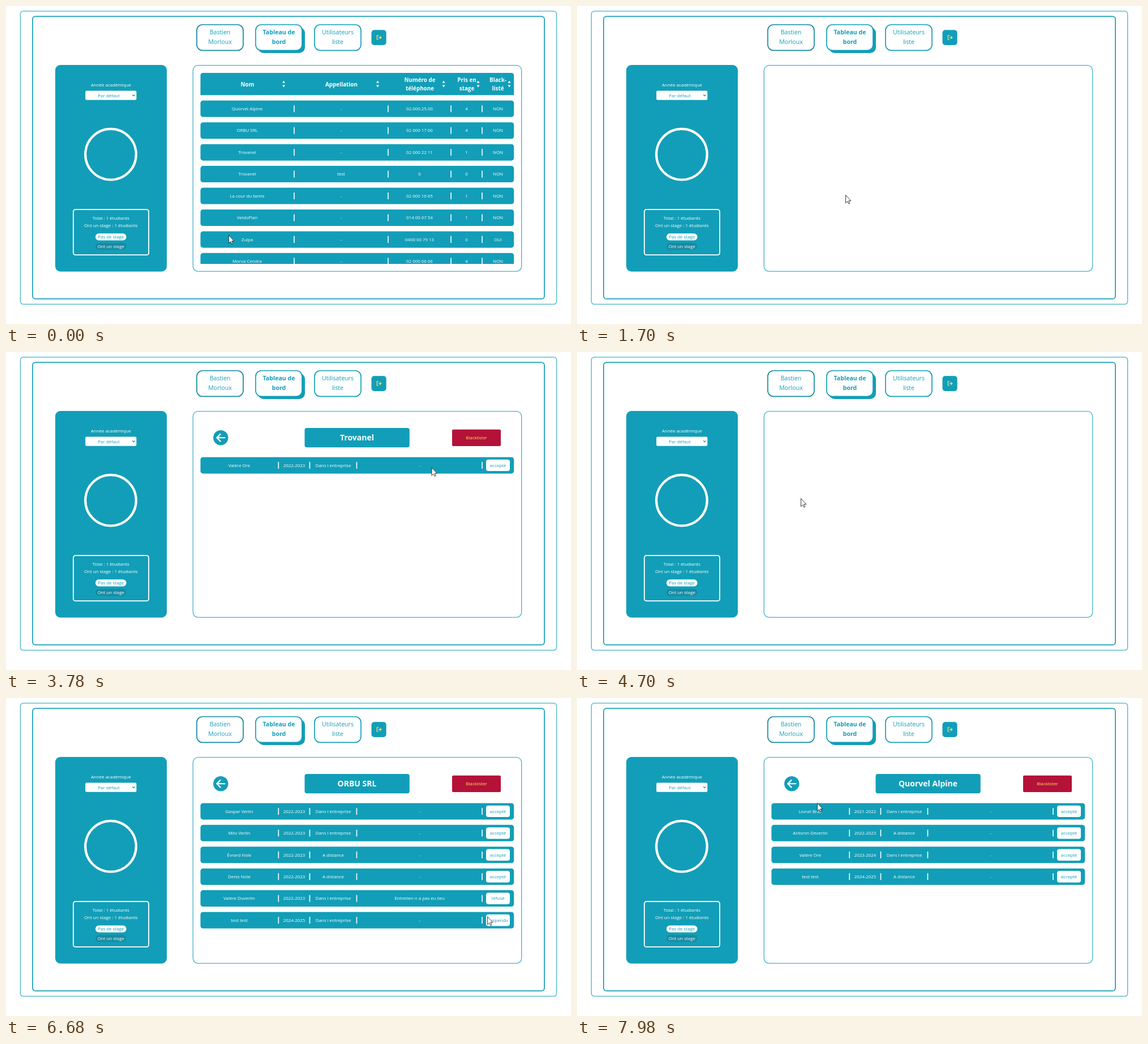
These frames come from a looping animation (998x561 px, 8 s). An HTML page:

```html
<!DOCTYPE html>
<html lang="fr">
<head>
<meta charset="utf-8">
<title>Tableau de bord</title>
<style>
  html, body { margin: 0; width: 100%; height: 100%; overflow: hidden; background: #fff; }
  svg { display: block; width: 100vw; height: 100vh; }
  text { font: 7.9px "Open Sans", "Noto Sans", sans-serif; text-anchor: middle; fill: #fff; }
  .teal { fill: #129eb8; }
  .line { fill: #fff; stroke: #129eb8; stroke-width: 1.7; }
  .thin { fill: none; stroke: #45b2c7; stroke-width: 1.3; }
  .nav { font-size: 10.6px; fill: #129eb8; }
  .bold { font-weight: 700; }
  .head { font-size: 9.85px; font-weight: 700; }
  .title { font-size: 14px; font-weight: 700; }
  .white { fill: #fff; }
  .stroke { fill: none; stroke: #fff; }
  .yellow { fill: #f5e663; }
</style>
</head>
<body>
<svg id="stage" viewBox="0 0 998 561"></svg>
<script>
const LOOP = 8000, FADE = 80, ENTER = 100, STAGGER = 26, RISE = 52;
const ROW_STEP = 38.43, ROW_HEIGHT = 29;
const EASE_OUT = 'cubic-bezier(.3333,.6667,.6667,1)';

const companies = [
  ['Quorvel Alpine', '-', '02.000.25.00', 4, 'NON'],
  ['ORBU SRL', '-', '02 000 17 60', 4, 'NON'],
  ['Trovanel', '-', '02 000 22 11', 1, 'NON'],
  ['Trovanel', 'test', '0', 0, 'NON'],
  ['La cour du tamis', '-', '02 000 16 65', 1, 'NON'],
  ['VeldoPlan', '-', '014 00 67 54', 1, 'NON'],
  ['Zulpa', '-', '0400 00 79 13', 0, 'OUI'],
  ['Morva Cendra', '-', '02 000 66 66', 4, 'NON']
];

const ONSITE = 'Dans l entreprise', REMOTE = 'A distance';
const interns = {
  'Zulpa': [['Milo Verlin', '2022-2023', ONSITE, '-', 'refusé']],
  'Trovanel': [['Valère Ore', '2022-2023', ONSITE, '-', 'accepté']],
  'ORBU SRL': [
    ['Gaspar Verlin', '2022-2023', ONSITE, '-', 'accepté'],
    ['Milo Verlin', '2022-2023', ONSITE, '-', 'accepté'],
    ['Évrard Nole', '2022-2023', REMOTE, '-', 'accepté'],
    ['Denis Nole', '2022-2023', REMOTE, '-', 'accepté'],
    ['Valère Duverlin', '2022-2023', ONSITE, 'Entretien n a pas eu lieu', 'refusé'],
    ['test test', '2024-2025', ONSITE, '-', 'suspendu']
  ],
  'Quorvel Alpine': [
    ['Lionel Brac', '2021-2022', ONSITE, '-', 'accepté'],
    ['Antonin Deverlin', '2022-2023', REMOTE, '-', 'accepté'],
    ['Valère Ore', '2023-2024', ONSITE, '-', 'accepté'],
    ['test test', '2024-2025', REMOTE, '-', 'accepté']
  ]
};

// Each view: entrance time, exit time, and the company for a detail view.
const views = [
  [-1, 180],
  [330, 1590, 'Zulpa'],
  [1780, 2780],
  [3060, 4580, 'Trovanel'],
  [4760, 5360],
  [5540, 7215, 'ORBU SRL'],
  [7330, 7630],
  [7760, LOOP, 'Quorvel Alpine']
];

const cursorPath = [
  [0, 393, 404], [180, 392, 400], [480, 165, 160], [620, 230, 61], [800, 420, 150],
  [1050, 840, 150], [1200, 912, 200], [1350, 880, 290], [1560, 380, 150], [1640, 400, 190],
  [1700, 474, 333], [2100, 476, 325], [2240, 476, 325], [2450, 316, 300], [2780, 466, 258],
  [2940, 470, 260], [3060, 470, 262], [3350, 600, 215], [3600, 860, 205], [4200, 500, 200],
  [4580, 380, 150], [4670, 385, 200], [4700, 395, 258], [5340, 440, 222], [5560, 450, 230],
  [5700, 499, 279], [6320, 800, 400], [6680, 850, 385], [6800, 860, 410], [7100, 381, 150],
  [7200, 380, 151], [7600, 424, 186], [8000, 424, 185]
];

const text = (x, y, value, cls = '') =>
  `<text x="${x}" y="${y}" dy=".35em" class="${cls}">${value}</text>`;
const rect = (x, y, w, h, r, cls, extra = '') =>
  `<rect x="${x}" y="${y}" width="${w}" height="${h}" rx="${r}" class="${cls}" ${extra}/>`;
const anim = (start, end, rise, body) =>
  `<g data-start="${start}" data-end="${end}" data-rise="${rise}">${body}</g>`;
const separators = (xs, y) => xs.map(x => rect(x - .8, y - 6, 1.6, 12, 0, 'white')).join('');
const sorter = x =>
  `<path class="white" d="M${x - 2.6} 135.8h5.2l-2.6-4zM${x - 2.6} 139.6h5.2l-2.6 4z"/>`;

function rows(data, top, bottom, start, end, id, drawRow) {
  const body = data.map((cells, i) => {
    const y = top + i * ROW_STEP;
    return anim(start < 0 ? start : start + i * STAGGER, end, RISE,
      rect(343.5, y, 553.7, ROW_HEIGHT, 4.5, 'teal') + drawRow(cells, y + ROW_HEIGHT / 2));
  }).join('');
  return `<clipPath id="${id}"><rect x="343" y="${top - 2}" width="555" height="${bottom - top + 2}"/></clipPath>
    <g clip-path="url(#${id})">${body}</g>`;
}

function tableView(start, end, id) {
  const centers = [426, 592, 730.5, 813.5, 869];
  const header = '<path class="teal" d="M343.5 157.3V122.5a4.5 4.5 0 0 1 4.5-4.5H892.7a4.5 4.5 0 0 1 4.5 4.5V157.3z"/>' +
    text(426.5, 138.5, 'Nom', 'head') + text(592.5, 138.5, 'Appellation', 'head') +
    text(731, 130.5, 'Numéro de', 'head') + text(731, 146, 'téléphone', 'head') +
    text(814, 130.5, 'Pris en', 'head') + text(814, 146, 'stage', 'head') +
    text(869, 130.5, 'Black-', 'head') + text(869, 146, 'listé', 'head') +
    [490.5, 656.5, 773, 834, 889].map(sorter).join('');
  return anim(start, end, 0, header) +
    rows(companies, 166.8, 455, start, end, id, (cells, y) =>
      cells.map((c, i) => text(centers[i], y, c)).join('') +
      separators([509, 675, 786, 841], y));
}

function detailView(start, end, id, name) {
  const data = interns[name], top = 185.4;
  const centers = [412, 509, 578, 730.5, 869];
  const header = '<circle cx="379.3" cy="151.2" r="13.2" class="teal"/>' +
    '<path class="stroke" stroke-width="2.3" stroke-linecap="round" stroke-linejoin="round" d="M386.5 151.2H372.5M378.5 145l-6.2 6.2 6.2 6.2"/>' +
    rect(527.5, 134, 185.3, 34.2, 4, 'teal') + text(620, 151.5, name, 'title') +
    rect(788, 136.7, 86, 29.3, 2, '', 'fill="#b41238"') + text(831, 151.5, 'Blacklister', 'yellow');
  const bottom = top + (data.length - 1) * ROW_STEP + ROW_HEIGHT + .5;
  return anim(start, end, 0, header) +
    rows(data, top, bottom, start, end, id, (cells, y) =>
      rect(848, y - 10.2, 42, 20.4, 4, 'white') +
      cells.map((c, i) => text(centers[i], y, c, i === 4 ? 'teal' : '')).join('') +
      separators([481.3, 536.5, 619.5, 841], y));
}

const frame =
  rect(25.4, 9.2, 947.2, 517, 5, 'thin') +
  rect(47, 18.3, 904, 498.4, 5, 'line') +
  rect(337, 33, 82, 45.3, 10, 'line', 'style="stroke:#1389a2"') +
  text(378, 46.5, 'Bastien', 'nav') + text(378, 63.5, 'Morloux', 'nav') +
  rect(445, 37.5, 83, 45.5, 10, 'teal') + rect(441, 33, 82, 45.3, 10, 'line') +
  text(482, 46.5, 'Tableau de', 'nav bold') + text(482, 63.5, 'bord', 'nav bold') +
  rect(545, 33, 82, 45.3, 10, 'line') +
  text(586, 46.5, 'Utilisateurs', 'nav') + text(586, 63.5, 'liste', 'nav') +
  rect(645.5, 42.3, 26.2, 26.6, 5, 'teal') +
  '<path d="M658 52.2h-2.8v6.8h2.8M657.6 55.6h5M660.4 53.2l2.4 2.4-2.4 2.4" fill="none" stroke="#f5e663" stroke-width="1.2"/>' +
  rect(330.3, 104.7, 580.4, 363.4, 9, 'thin');

const sidebar =
  rect(87, 104, 197, 364.5, 9, 'teal') +
  text(185.5, 139.5, 'Année académique') +
  rect(140.2, 149.6, 90.2, 16.2, 2, 'white') + text(181.5, 158, 'Par défaut', 'teal') +
  '<path d="M223.2 156.4l2.2 2.2 2.2-2.2" fill="none" stroke="#23788a" stroke-width="1.2"/>' +
  '<circle cx="185" cy="261.7" r="44.8" class="stroke" stroke-width="4.2"/>' +
  rect(118.9, 359, 133.2, 80.2, 4, 'stroke', 'stroke-width="1.8"') +
  text(185.3, 374.3, 'Total : 1 étudiants') + text(185.3, 386.8, 'Ont un stage : 1 étudiants') +
  rect(158, 401.3, 54.6, 12.3, 6, 'white') + text(185.3, 407.6, 'Pas de stage', 'teal') +
  rect(158, 418, 54.6, 12.3, 6, '', 'fill="#188aa2"') + text(185.3, 424.2, 'Ont un stage');

const pointer = `<g id="cursor">
  <path id="arrow" d="M.5 .5V14.6L3.7 11.6 5.9 16 7.9 15 5.8 10.7H10Z" fill="#fff" stroke="#222" stroke-width=".9"/>
  <path id="beam" d="M-2 -4.5H2M0 -4.5V4.5M-2 4.5H2" fill="none" stroke="#123" stroke-width="1"/></g>`;

const stage = document.getElementById('stage');
stage.innerHTML = frame + sidebar + views.map(([start, end, name], i) =>
  name ? detailView(start, end, 'clip' + i, name) : tableView(start, end, 'clip' + i)).join('') + pointer;

const play = (el, frames) => el.animate(
  frames.map(({ at, ...props }) => ({ offset: at / LOOP, ...props })),
  { duration: LOOP, iterations: Infinity });

for (const el of stage.querySelectorAll('[data-start]')) {
  const { start, end, rise } = el.dataset;
  const from = +start, to = +end;
  const shown = { opacity: 1, transform: 'translateY(0px)' };
  const below = { opacity: 0, transform: `translateY(${rise}px)` };
  const gone = { ...shown, opacity: 0 };
  const frames = from < 0 ? [{ at: 0, ...shown }] : [
    { at: 0, ...below },
    { at: from, ...below, easing: EASE_OUT },
    { at: from + ENTER, ...shown }
  ];
  frames.push({ at: to, ...shown });
  if (to < LOOP) frames.push({ at: to + FADE, ...gone }, { at: LOOP, ...gone });
  play(el, frames);
}

play(document.getElementById('cursor'), cursorPath.map(([at, x, y]) =>
  ({ at, transform: `translate(${x}px, ${y}px)` })));

// The pointer turns into a text beam while it crosses a cell's text.
const swap = (id, normal, over) => play(document.getElementById(id),
  [[0, normal], [5670, over], [5750, normal], [LOOP, normal]].map(([at, opacity]) =>
    ({ at, opacity, easing: 'steps(1, end)' })));
swap('arrow', 1, 0);
swap('beam', 0, 1);
</script>
</body>
</html>
```
